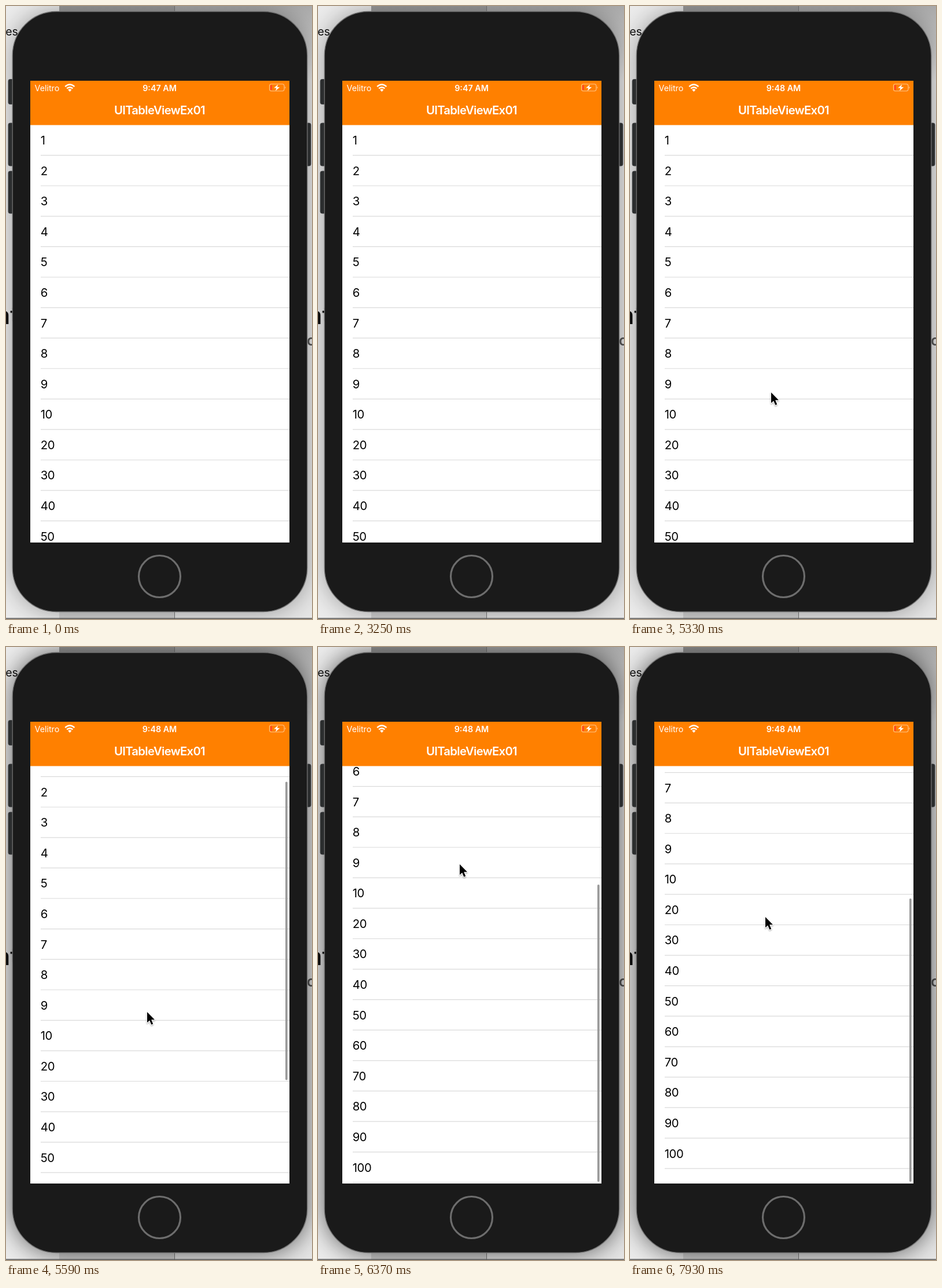
Animation of 529x1058 px, one loop 8000 ms. Source, as an HTML page:

```html
<!DOCTYPE html>
<html lang="en">
<head>
<meta charset="utf-8">
<title>Table view scrolling</title>
<style>
html, body { margin: 0; width: 100%; height: 100%; overflow: hidden; background: #ddd; }
svg { display: block; width: 100vw; height: 100vh; font-family: Inter, Roboto, sans-serif; }
</style>
</head>
<body>
<svg viewBox="0 0 529 1058" preserveAspectRatio="none">
  <defs>
    <filter id="blur" x="-30%" y="-20%" width="160%" height="140%"><feGaussianBlur stdDeviation="22"/></filter>
    <filter id="drop" x="-50%" y="-50%" width="200%" height="200%">
      <feDropShadow dx="0" dy="1.5" stdDeviation="1.2" flood-opacity=".35"/>
    </filter>
    <linearGradient id="fade" x2="0" y2="1">
      <stop offset="0" stop-color="#000" stop-opacity=".26"/>
      <stop offset="1" stop-color="#000" stop-opacity="0"/>
    </linearGradient>
    <clipPath id="list"><rect x="42" y="205.5" width="448" height="720.5"/></clipPath>
  </defs>

  <!-- windows behind the phone -->
  <rect width="529" height="1058" fill="#ececec"/>
  <rect x="92" width="199" height="1058" fill="#d2d2d2"/>
  <rect x="291" width="238" height="1058" fill="#e6e6e6"/>
  <rect x="92" width="437" height="130" fill="url(#fade)"/>
  <path d="M291.5 0V1058" stroke="#777"/>
  <text x="-7" y="51" font-size="19.5" fill="#111">tes</text>
  <text x="-16" y="549" font-size="41" font-weight="500" fill="#111">at</text>
  <text x="520" y="586" font-size="25" font-weight="600" fill="#555">c</text>
  <rect id="shade" x="11" y="9" width="510" height="1037" rx="76" filter="url(#blur)"/>
  <path d="M0 1057H529" stroke="#555" stroke-width="1.4"/>

  <!-- phone body -->
  <g fill="#2b2d2e" stroke="#3c3e40" stroke-width=".8">
    <rect x="4" y="126.500" width="12" height="43" rx="3"/>
    <rect x="4" y="202" width="12" height="74" rx="3"/>
    <rect x="4" y="285" width="12" height="73" rx="3"/>
    <rect x="515" y="202" width="12" height="74" rx="3"/>
  </g>
  <rect x="11.200" y="9.500" width="509.600" height="1036" rx="76" fill="#1a1a1a" stroke="#717171" stroke-width="1.300"/>
  <circle cx="265.500" cy="984.500" r="36" fill="none" stroke="#6d6d6d" stroke-width="3.200"/>

  <!-- screen -->
  <rect x="42" y="129" width="448" height="797" fill="#fff"/>
  <g clip-path="url(#list)">
    <g id="rows"></g>
    <rect id="bar" x="483" width="3.600" rx="1.800" fill="#999"/>
  </g>
  <rect x="42" y="129" width="448" height="76.500" fill="#ff8000"/>
  <g fill="#fff">
    <text x="49.500" y="146.500" font-size="14.300">Velitro</text>
    <text id="clock" x="265.500" y="146.500" font-size="14.300" font-weight="600" text-anchor="middle"></text>
    <text x="265.500" y="187" font-size="20.300" font-weight="600" letter-spacing="-.7" text-anchor="middle">UITableViewEx01</text>
    <path d="M110.300 148L107.200 144.600Q110.300 142 113.400 144.600Z"/>
  </g>
  <g fill="none" stroke="#fff" stroke-width="2.400">
    <path d="M105.200 142.400Q110.300 138 115.400 142.400"/>
    <path d="M102.200 139.100Q110.300 132 118.400 139.100"/>
  </g>
  <rect x="455.500" y="134.800" width="25.400" height="12" rx="3.200" fill="none" stroke="#fff" stroke-opacity=".55" stroke-width="1.100"/>
  <path d="M482.300 138.800Q484.600 140.800 482.300 142.800Z" fill="#fff" fill-opacity=".6"/>
  <rect x="457.300" y="136.600" width="2.400" height="8.400" rx="1" fill="#ff3b30"/>
  <path d="M470 135.400L463.200 141.600H467.400L466 146.400L473.200 140H468.900Z" fill="#fff"/>

  <g id="cursor" filter="url(#drop)">
    <path d="M0 0V18.300L4.200 14.400L7.300 21.700L10.200 20.400L7.200 13.300H13Z" stroke="#fff" stroke-width="2" paint-order="stroke" stroke-linejoin="round"/>
  </g>
</svg>
<script>
const LOOP = 8000, STEP = 130, PITCH = 52.58, MAX = 278;
const NIGHT = 5460, MINUTE = 4290, DRAG = 5590, ENTER = 3510;
const get = id => document.getElementById(id);
const [shade, rows, bar, clock, cursor] = ['shade', 'rows', 'bar', 'clock', 'cursor'].map(get);

// [time, x, y]
const path = [
  [3510, 16, 490], [3770, 160, 512], [4030, 264, 534], [4550, 241, 584],
  [4680, 241, 584], [5200, 244, 667], [5460, 244, 667], [5590, 244, 630],
  [5720, 244, 470], [5850, 243.5, 364], [6110, 244, 366], [6370, 245, 375],
  [6630, 245, 378], [7150, 204, 703], [7410, 229, 692], [7540, 229, 688],
  [7670, 230, 640], [7800, 232, 555], [7930, 234, 466]
];
// [time, scroll offset]
const scroll = [
  [5460, 0], [5590, 34], [5720, 190], [5850, 284], [6110, 284],
  [6370, 280], [6500, MAX], [7670, MAX], [7800, 286], [7930, 304]
];

function at(keys, t, n = 1) {
  if (t <= keys[0][0]) return keys[0][n];
  for (let i = 1; i < keys.length; i++) {
    const a = keys[i - 1], b = keys[i];
    if (t <= b[0]) return a[n] + (b[n] - a[n]) * (t - a[0]) / (b[0] - a[0]);
  }
  return keys[keys.length - 1][n];
}

let list = '';
for (let i = 0; i < 19; i++) {
  const y = 205.5 + i * PITCH, label = i < 9 ? i + 1 : (i - 8) * 10;
  list += `<text x="59.7" y="${y + 33.6}" font-size="20.3" letter-spacing="-.4">${label}</text>` +
    `<path d="M60 ${y + PITCH - .4}H490" stroke="#dadada" stroke-width="1.2"/>`;
}
rows.innerHTML = list;

function draw(ms) {
  const t = Math.floor(ms % LOOP / STEP) * STEP;
  const off = at(scroll, t);
  rows.setAttribute('transform', `translate(0 ${-off})`);

  const over = Math.max(0, off - MAX);
  bar.setAttribute('y', 208 + 200 * Math.min(1, off / MAX) + over);
  bar.setAttribute('height', 515 - over);
  bar.style.display = t >= DRAG ? '' : 'none';

  clock.textContent = t >= MINUTE ? '9:48 AM' : '9:47 AM';
  shade.setAttribute('opacity', t >= NIGHT ? .6 : .34);

  cursor.style.display = t >= ENTER ? '' : 'none';
  cursor.setAttribute('transform', `translate(${at(path, t)} ${at(path, t, 2)})`);
}

const start = performance.now();
function tick() {
  draw(performance.now() - start);
  requestAnimationFrame(tick);
}
tick();
</script>
</body>
</html>
```
